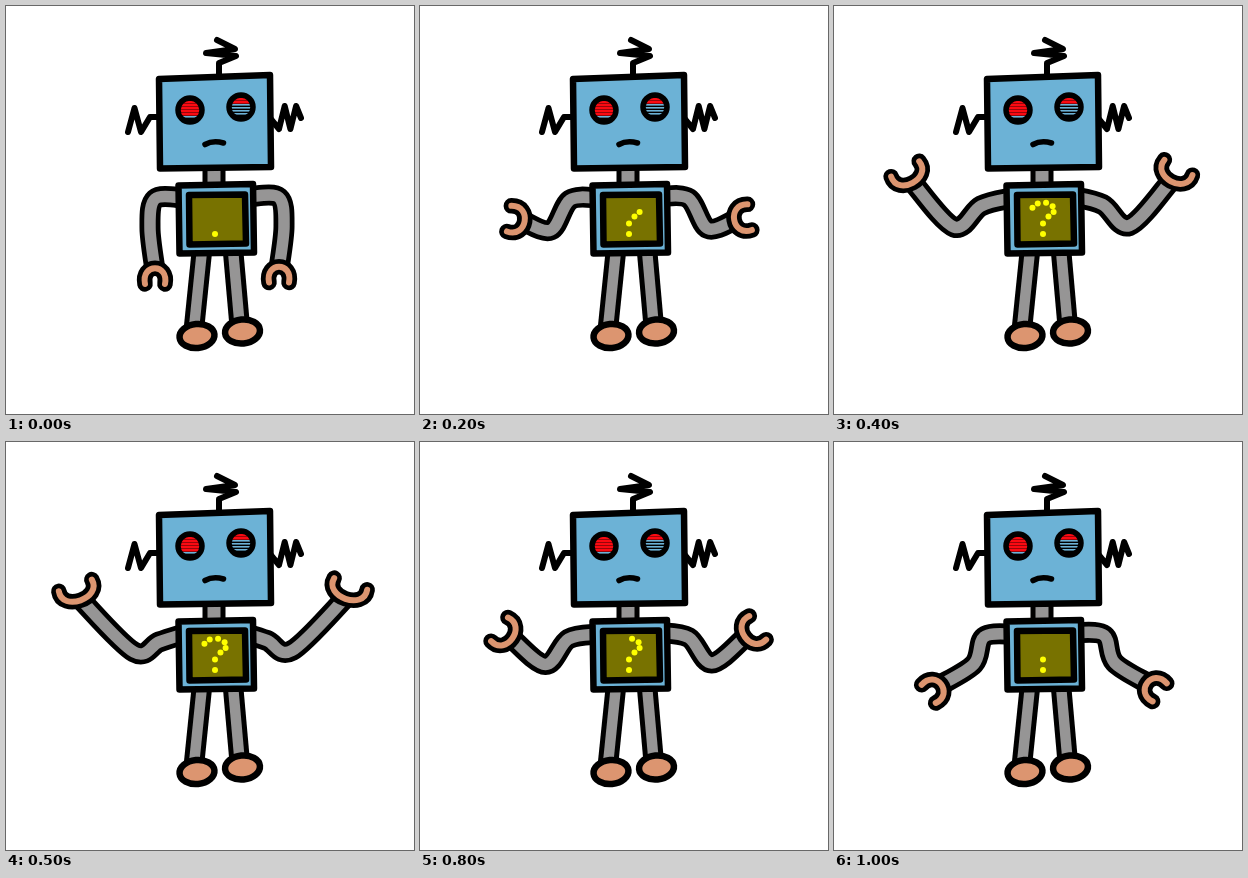
An HTML page with a canvas for the animation above (1100 ms loop, 408 px wide and 408 px high).

```html
<!DOCTYPE html>
<html lang="en">
<head>
<meta charset="utf-8">
<title>Shrugging robot</title>
<style>
html, body { margin: 0; width: 100%; height: 100%; overflow: hidden; background: #fff; }
canvas { display: block; width: 408px; height: 408px; }
</style>
</head>
<body>
<canvas id="stage" width="408" height="408"></canvas>
<script>
const ctx = document.getElementById('stage').getContext('2d');
const INK = '#000', BLUE = '#6cb2d6', GREY = '#969595', SKIN = '#dc9570';
const OLIVE = '#787200', RED = '#fb0a12', YELLOW = '#ffff00';

const STEP = 100, STEPS = 11;
const SHOULDER = [178, 192];

// key poses of the left arm by lift level, blended in between
const KEYS = [
  { level: 0, elbow: [149, 193], bend: [144, 222], hand: [149, 270], turn: -3.14 },
  { level: 1, elbow: [150, 195], bend: [140, 222], hand: [101, 247], turn: -2.23 },
  { level: 2, elbow: [150, 194], bend: [131, 224], hand: [97, 214], turn: -1.4 },
  { level: 4, elbow: [147, 200], bend: [120, 221], hand: [75, 170], turn: -0.5 },
  { level: 5, elbow: [153, 200], bend: [128, 210], hand: [72, 151], turn: -0.34 }
];

function poseAt(level) {
  const next = KEYS.find(key => key.level >= level);
  const prev = KEYS.findLast(key => key.level <= level);
  const t = next === prev ? 0 : (level - prev.level) / (next.level - prev.level);
  const mix = (a, b) => a + (b - a) * t;
  const point = name => prev[name].map((v, i) => mix(v, next[name][i]));
  return {
    elbow: point('elbow'), bend: point('bend'), hand: point('hand'),
    turn: mix(prev.turn, next.turn)
  };
}

function line(color, width) {
  ctx.strokeStyle = color;
  ctx.lineWidth = width;
  ctx.stroke();
}

function paint(fill, width) {
  ctx.fillStyle = fill;
  ctx.fill();
  if (width) line(INK, width);
}

function tube(color, outer, inner) {
  line(INK, outer);
  line(color, inner);
}

function trace(points, closed) {
  ctx.beginPath();
  points.forEach(([x, y]) => ctx.lineTo(x, y));
  if (closed) ctx.closePath();
}

function oval(x, y, rx, ry = rx, turn = 0) {
  ctx.beginPath();
  ctx.ellipse(x, y, rx, ry, turn, 0, Math.PI * 2);
}

function smooth(p) {
  ctx.beginPath();
  ctx.moveTo(...p[0]);
  for (let i = 0; i < p.length - 1; i++) {
    const a = p[i - 1] || p[i], b = p[i], c = p[i + 1], d = p[i + 2] || c;
    ctx.bezierCurveTo(
      b[0] + (c[0] - a[0]) / 6, b[1] + (c[1] - a[1]) / 6,
      c[0] - (d[0] - b[0]) / 6, c[1] - (d[1] - b[1]) / 6,
      c[0], c[1]);
  }
}

function zigzag(x, y, pitch, swing, count) {
  return Array.from({ length: count }, (_, i) => [x + i * pitch, y + (i % 2 ? -swing : swing)]);
}

function claw([x, y], turn, spread) {
  ctx.save();
  ctx.translate(x, y);
  ctx.rotate(turn);
  ctx.lineCap = 'round';
  ctx.beginPath();
  ctx.moveTo(-spread, -8);
  ctx.bezierCurveTo(-spread - 4, 13, spread + 4, 13, spread, -8);
  tube(SKIN, 15.5, 6);
  ctx.restore();
}

function limb(level) {
  const { elbow, bend, hand, turn } = poseAt(level);
  const wrist = [hand[0] - 6 * Math.sin(turn), hand[1] + 6 * Math.cos(turn)];
  ctx.lineCap = 'butt';
  smooth([SHOULDER, elbow, bend, wrist]);
  tube(GREY, 21, 11.5);
  claw(hand, turn, 10 + 1.5 * level);
}

function arms(level) {
  limb(level);
  ctx.save();
  ctx.translate(422 - 1.6 * level, -1.5);
  ctx.scale(-1, 1);
  limb(level);
  ctx.restore();
}

function leg(x, footX, footY) {
  ctx.lineCap = 'butt';
  trace([[x, 244], [footX - 3, footY - 8]]);
  tube(GREY, 20.5, 10.5);
  oval(footX, footY, 17.5, 12, -0.1);
  paint(SKIN, 6.5);
}

function eye(x, y, redRows) {
  oval(x, y, 12);
  paint(INK);
  ctx.save();
  ctx.clip();
  for (let row = 0; row < 6; row++) {
    ctx.fillStyle = row < redRows ? RED : BLUE;
    ctx.fillRect(x - 12, y - 9 + row * 3, 24, row < redRows ? 2.6 : 1.6);
  }
  ctx.restore();
  oval(x, y, 12);
  line(INK, 5.5);
}

function head() {
  ctx.lineCap = 'round';
  trace([[199, 160], [199, 180], [217, 180], [217, 160]]);
  paint(GREY, 5);
  trace([[213, 68], [213, 57], [230, 50], [200, 47], [229, 43], [211, 34]]);
  line(INK, 6);
  trace([...zigzag(122, 114, 6.5, 12, 3), [144, 111], [153, 111]]);
  line(INK, 6);
  trace([[264, 112], ...zigzag(273, 111.5, 5.7, 11.5, 4), [295, 112]]);
  line(INK, 6);
  trace([[153, 73], [264, 69], [265, 161], [154, 162.5]], true);
  paint(BLUE, 6.5);
  eye(184, 104, 5);
  eye(235, 101, 2);
  ctx.beginPath();
  ctx.moveTo(199, 138.5);
  ctx.quadraticCurveTo(207, 134, 217.5, 137);
  line(INK, 5.5);
}

// two lamps for the stem, the rest curl round the hook of the question mark
function lamp(i) {
  if (i < 2) return [209, 228 - 10.5 * i];
  const angle = 1.05 - 0.78 * (i - 2);
  return [209 + 11 * Math.cos(angle), 204 + 7.5 * Math.sin(angle)];
}

function torso(lit) {
  trace([[172.5, 179.5], [247, 178], [248, 246.5], [173.5, 247.5]], true);
  paint(BLUE, 6.5);
  trace([[183, 189], [239, 188.5], [240, 237.5], [183.5, 238.5]], true);
  paint(OLIVE, 6.5);
  for (let i = 0; i < lit; i++) {
    oval(...lamp(i), 3);
    paint(YELLOW);
  }
}

function draw(time) {
  const beat = Math.floor(time / STEP) % STEPS;
  const level = Math.min(beat, STEPS - beat);
  ctx.fillStyle = '#fff';
  ctx.fillRect(0, 0, 408, 408);
  ctx.lineJoin = 'round';
  leg(196, 191, 330);
  leg(227, 236.5, 325.5);
  arms(level);
  head();
  torso(Math.min(8, Math.max(level + 1, level * 2)));
}

const start = performance.now();
function tick() {
  draw(performance.now() - start);
  requestAnimationFrame(tick);
}
tick();
</script>
</body>
</html>
```
